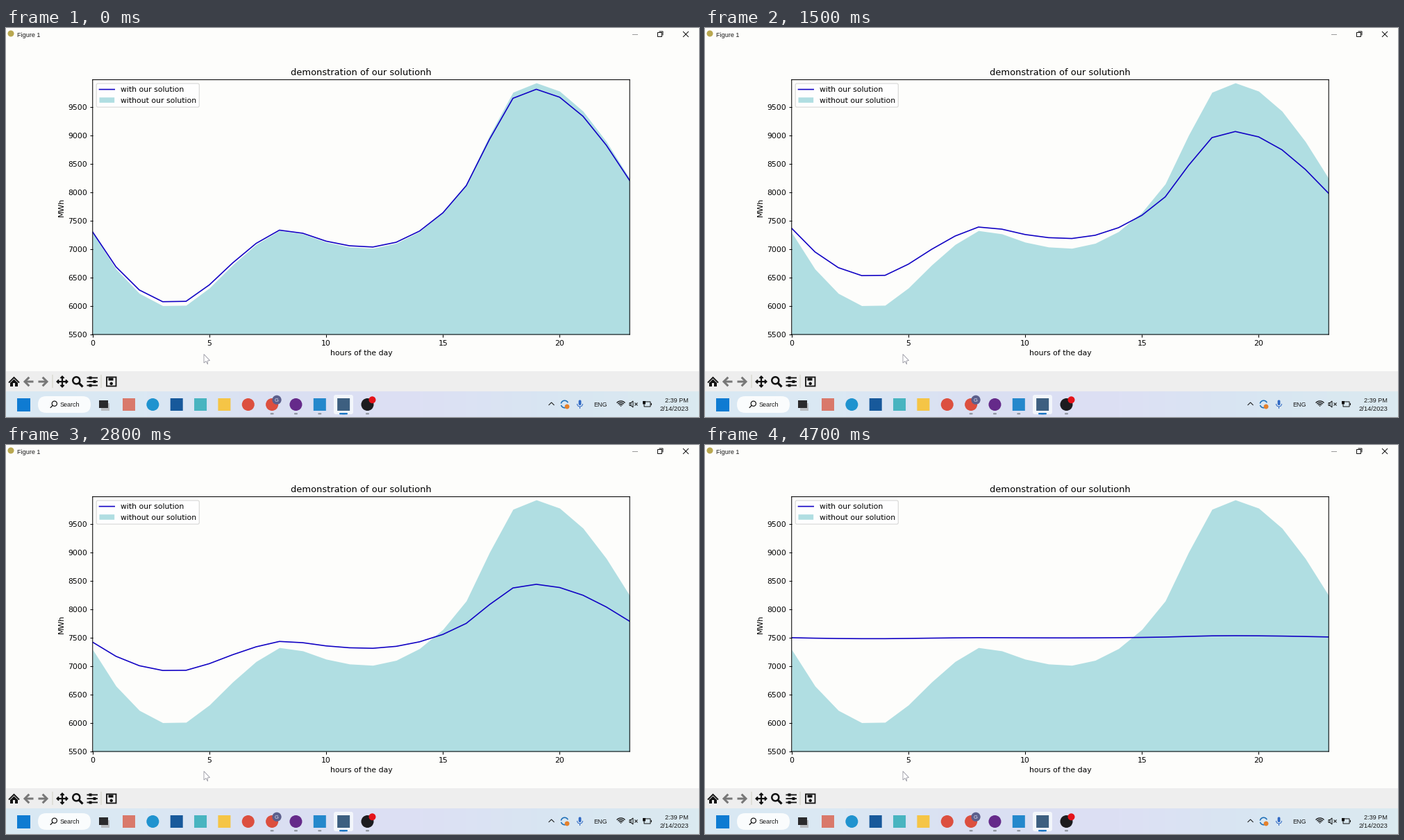
Animation of 998x561 px, one loop 4800 ms. Source, as a matplotlib script:

```python
import numpy as np
import matplotlib.pyplot as plt
from matplotlib.animation import FuncAnimation
from matplotlib.colors import LinearSegmentedColormap
from matplotlib.patches import Arc, Circle, FancyBboxPatch, Polygon, Rectangle

W, H, DPI = 998, 561, 64
PT = 72 / DPI          # points per pixel
S = 78 / DPI           # chart style is laid out at 78 dpi
FRAMES = 48

PAPER, AREA, CURVE = "#fdfdfb", "#b0dee2", "#1000c4"
INK, GREY, BLUE = "#111111", "#777777", "#2f68c4"

plt.rcParams.update({
    "font.family": "DejaVu Sans",
    "font.size": 10 * S,
    "path.snap": False,
    "axes.linewidth": 0.96 * S,
    "axes.titlepad": 6 * S,
    "axes.labelpad": 4 * S,
    "lines.linewidth": 1.5 * S,
    "patch.linewidth": S,
    **{f"{a}tick.major.{k}": v * S for a in "xy"
       for k, v in (("size", 3.5), ("pad", 3.5), ("width", 0.96))},
})

fig = plt.figure(figsize=(W / DPI, H / DPI), dpi=DPI, facecolor=PAPER)
ui = fig.add_axes([0, 0, 1, 1], zorder=0)
ui.axis("off")


# drawing helpers, all in pixels from the top left
def box(x, y, w, h, color):
    ui.add_patch(Rectangle((x, y), w, h, fc=color, lw=0))


def frame(x, y, w, h, lw=1.0):
    ui.add_patch(Rectangle((x, y), w, h, fill=False, ec=INK, lw=lw * PT))


def pill(x, y, w, h, r, color):
    ui.add_patch(FancyBboxPatch((x + r, y + r), w - 2 * r, h - 2 * r, fc=color, lw=0,
                                boxstyle=f"round,pad={r},rounding_size={r}"))


def disc(x, y, r, color):
    ui.add_patch(Circle((x, y), r, fc=color, lw=0))


def square(x, y, r, color):
    box(x - r, y - r, 2 * r, 2 * r, color)


def arc(x, y, r, a, b, color=INK, w=1.0):
    ui.add_patch(Arc((x, y), 2 * r, 2 * r, theta1=a, theta2=b, ec=color, lw=w * PT))


def stroke(x, y, color=INK, w=1.0):
    ui.plot(x, y, color=color, lw=w * PT, solid_capstyle="butt", solid_joinstyle="miter")


def chevron(x, y, dx, dy, r, color=INK, w=1.0):
    """Open arrow head with its tip at (x, y), pointing along (dx, dy)."""
    stroke([x - r * (dx - dy), x, x - r * (dx + dy)],
           [y - r * (dy + dx), y, y - r * (dy - dx)], color, w)


def cross(x, y, r):
    for k in (-r, r):
        stroke([x - r, x + r], [y - k, y + k])


def lens(x, y, r, w):
    arc(x, y, r, 0, 360, INK, w)
    return x, y


def label(x, y, text, size=9.0, color="#1a1a1a", ha="left"):
    ui.text(x, y, text, fontsize=size * PT, color=color, ha=ha, va="baseline",
            family="Liberation Sans")


def title_bar():
    disc(7, 8, 4.5, "#b9a850")
    label(16, 12.5, "Figure 1")
    stroke([902, 910], [9.5, 9.5], "#9a9a9a")
    frame(938.5, 6.5, 6, 6)
    stroke([940.5, 946, 946], [5, 5, 10.5])
    cross(979, 9, 4)


def toolbar():
    box(0, 495, W, 29, "#eeeeee")
    # home
    chevron(11.5, 504, 0, -1, 7.5, INK, 1.9)
    ui.add_patch(Polygon([(11.5, 506.5), (17, 512), (6, 512)], fc=INK, lw=0))
    for x in (6, 13):
        box(x, 511.5, 4, 5.5, INK)
    # back and forward
    for x, d in ((33, -1), (53, 1)):
        stroke([x - d * 6.5, x + d * 5], [510, 510], GREY, 3)
        chevron(x + d * 6, 510, d, 0, 6.3, GREY, 3)
    for x in (67, 137):
        stroke([x, x], [500, 519], "#d2d2c4")
    # pan
    for dx, dy in ((1, 0), (-1, 0), (0, 1), (0, -1)):
        stroke([81, 81 + 7 * dx], [510, 510 + 7 * dy], INK, 2.2)
        chevron(81 + 7.5 * dx, 510 + 7.5 * dy, dx, dy, 2.6, INK, 2)
    # zoom
    arc(101.3, 508.3, 5, 0, 360, INK, 2.5)
    stroke([105, 110.5], [512, 517.5], INK, 3.2)
    # sliders
    for i in range(3):
        y = 504.5 + 5.5 * i
        stroke([116.5, 132], [y, y], INK, 1.8)
        square(121.5 + 6 * (i % 2), y, 2, INK)
    # save
    frame(145, 503.5, 13.5, 13, 1.8)
    box(147.5, 504.5, 7, 4, INK)
    disc(151.7, 512.8, 2.2, INK)


def tray():
    chevron(785.5, 540, 0, -1, 4)
    for a in (20, 190):
        arc(804.5, 542.5, 5.2, a, a + 145, "#1d6fb8", 1.6)
    disc(808, 546, 3.4, "#e5812b")
    pill(824.6, 536.5, 3.8, 7.5, 1.8, BLUE)
    arc(826.5, 542, 4, 0, 180, BLUE)
    stroke([826.5, 826.5], [546, 549], BLUE)
    label(846.5, 546, "ENG")
    for r in (1, 3.3, 5.6, 8):
        arc(885.5, 546, r, 222, 318, INK, 1.3)
    frame(898, 540.5, 2, 4)
    stroke([900, 903, 903, 900], [540.5, 538, 547, 544.5])
    cross(907.5, 542.5, 2)
    frame(919, 539, 9, 7)
    stroke([929.3, 929.3], [541, 544], INK, 1.2)
    box(917, 538, 4, 4.5, INK)
    label(983, 539.5, "2:39 PM", 9.1, ha="right")
    label(983, 551.5, "2/14/2023", 9.4, ha="right")


def taskbar():
    sky = LinearSegmentedColormap.from_list(
        "sky", ["#d9e9f3", "#dbe8f4", "#dadff2", "#dde0f4", "#d8e6f2", "#dbeaf0"])
    ui.imshow(np.linspace(0, 1, W)[None], cmap=sky, extent=(0, W, H, 524), aspect="auto")
    square(25.5, 543.5, 9.5, "#0f7bd2")
    pill(46, 531, 76, 24, 12, "#fafcfd")
    arc(69.8, 541.7, 3.6, 0, 360, INK, 1.2)
    stroke([67.2, 63.8], [544.3, 547.8], INK, 1.3)
    label(78, 546.3, "Search")
    box(137, 541, 12, 11, "#b9bcc0")
    box(134, 537, 13, 11, "#2a2a2c")

    # evenly spaced apps; the last five but one window are running
    pill(472, 529, 28, 28, 3, "#f3f6fb")
    apps = [(square, "#d9796b"), (disc, "#1f93cf"), (square, "#17599b"),
            (square, "#48b4c0"), (square, "#f5c546"), (disc, "#dc4f3f"),
            (disc, "#dc4f3f"), (disc, "#652a8a"), (square, "#2488cc"),
            (square, "#3d5f80"), (disc, "#1c1c1f")]
    for i, (shape, color) in enumerate(apps):
        x = 177 + 34.35 * i
        shape(x, 543, 9, color)
        if i >= 6:
            pill(x - 2.5, 555.3, 5, 2, 1, "#868c94")
    pill(480, 555, 12, 2.4, 1.2, "#1b76c4")
    disc(390, 536.3, 6.6, "#5c5f8c")
    label(390, 539, "G", 7.5, "#dfe2f2", "center")
    disc(527.5, 536.3, 5, "#e5131a")
    tray()


def pointer(x, y):
    shape = np.array([(0, 0), (0, 12.5), (3, 10), (5.5, 14.5), (5.2, 9.5), (8.5, 9)])
    ui.add_patch(Polygon(shape + (x, y), fc="white", ec="#9c9ca6", lw=0.9 * PT))


title_bar()
toolbar()
taskbar()
pointer(285, 470.5)
ui.set_xlim(0, W)
ui.set_ylim(H, 0)

# demand in MWh at every second hour; odd hours lie on a smooth cubic between them
even = np.array([7292, 6222, 6013, 6722, 7325, 7122, 7014,
                 7308, 8145, 9755, 9775, 8890, 7450])
slope = np.gradient(even, 2, edge_order=2)
odd = (even[:-1] + even[1:]) / 2 + (slope[:-1] - slope[1:]) / 4
demand = np.column_stack([even[:-1], odd]).ravel()
hours = np.arange(24)
FLAT = 7502            # level the curve settles towards

ax = fig.add_axes([0.125, 1 - 442 / H, 0.775, 367.4 / H], zorder=1, facecolor=PAPER)
area = ax.fill_between(hours, 5500, demand, color=AREA, lw=0)
line, = ax.plot(hours, demand, color=CURVE)
ax.set(xlim=(0, 23), ylim=(5500, 9976), xticks=range(0, 21, 5),
       yticks=range(5500, 9501, 500), title="demonstration of our solutionh",
       xlabel="hours of the day", ylabel="MWh")
ax.legend([line, area], ["with our solution", "without our solution"], loc="upper left")


def update(i):
    # three of 150 flattening steps per tick, the ends held one step in
    step = 7 if i == 0 else min(8 + 3 * i, 148)
    line.set_ydata(demand + (FLAT - demand) * step / 150)
    return line,


anim = FuncAnimation(fig, update, frames=FRAMES, interval=100, repeat=True,
                     repeat_delay=0, blit=False)
plt.show()
```
